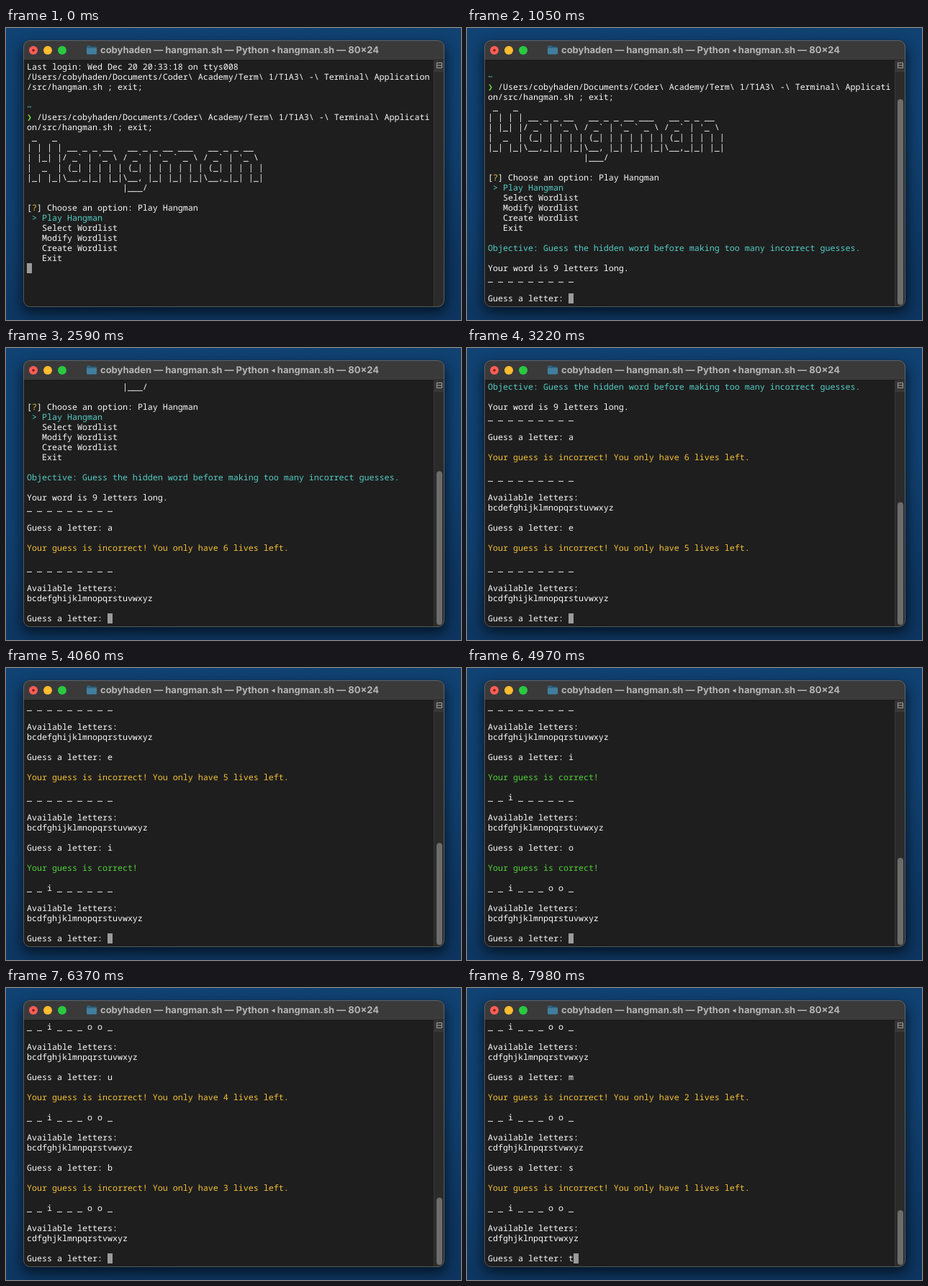
An HTML page that plays this animation: 632x406 px, repeating every 8 s.

```html
<!DOCTYPE html>
<html lang="en">
<head>
<meta charset="utf-8">
<title>Hangman in a terminal</title>
<style>
  html, body { margin: 0; width: 100%; height: 100%; overflow: hidden; background: #0d3660; }
  svg { display: block; width: 632px; height: 406px; }
  text { white-space: pre; text-rendering: geometricPrecision; }
  #screen text {
    font: 500 11.6667px "Noto Sans Mono", "DejaVu Sans Mono", monospace;
    font-variant-ligatures: none;
  }
  .title { font: 700 13px Inter, "Liberation Sans", sans-serif; fill: #b5b5b6; }
</style>
</head>
<body>
<svg viewBox="0 0 632 406" xmlns="http://www.w3.org/2000/svg">
  <defs>
    <linearGradient id="desk" x1="0" y1="0" x2="0.25" y2="1">
      <stop offset="0" stop-color="#104273"/>
      <stop offset="0.6" stop-color="#10406f"/>
      <stop offset="1" stop-color="#0d3560"/>
    </linearGradient>
    <filter id="blur" x="-10%" y="-10%" width="120%" height="125%">
      <feGaussianBlur stdDeviation="9"/>
    </filter>
    <clipPath id="frame"><rect x="24" y="17" width="585" height="371" rx="9"/></clipPath>
  </defs>

  <rect width="632" height="406" fill="url(#desk)"/>
  <rect x="22" y="24" width="589" height="372" rx="10" fill="#000" opacity=".6" filter="url(#blur)"/>

  <g clip-path="url(#frame)">
    <rect x="24" y="17" width="585" height="371" fill="#1e1e1e"/>
    <rect x="24" y="17" width="585" height="28" fill="#3a3a3b"/>
    <rect x="24" y="44.5" width="585" height="1" fill="#111"/>
    <rect x="594" y="45" width="15" height="343" fill="#2b2b2b"/>
    <rect x="594" y="45" width="1" height="343" fill="#383838"/>
    <rect x="594" y="45" width="15" height="15" fill="#353535"/>
    <rect x="594" y="59.5" width="15" height="1" fill="#444"/>
    <path d="M598.5 48.5h7v7h-7zM598.5 52h7" fill="none" stroke="#a0a0a0"/>
    <rect id="thumb" x="598" width="8" rx="4" fill="#6c6c6c"/>
  </g>
  <rect x="24.5" y="17.5" width="584" height="370" rx="9" fill="none" stroke="#777" stroke-opacity=".65"/>

  <circle cx="38" cy="31" r="6" fill="#fe5f57"/>
  <circle cx="38" cy="31" r="1.8" fill="#7d1712"/>
  <circle cx="58" cy="31" r="6" fill="#febc2e"/>
  <circle cx="78" cy="31" r="6" fill="#2ac840"/>

  <path d="M112 26q0-1.500 1.500-1.500h3.500l1.500 1.500h6q1.500 0 1.500 1.500v7.500q0 1.500-1.500 1.500h-11q-1.500 0-1.500-1.500z" fill="#2f6480"/>
  <path d="M112 28h14v7q0 1.500-1.500 1.500h-11q-1.500 0-1.500-1.500z" fill="#427f9d"/>

  <text class="title" x="131" y="35.300">cobyhaden — hangman.sh — Python</text>
  <path d="M368.500 31.500l5-2.700v5.400z" fill="#b5b5b6"/>
  <text class="title" x="518" y="35.300" text-anchor="end">hangman.sh — 80×24</text>

  <rect id="cursor" width="7" height="14" fill="#9b9b9b"/>
  <g id="screen"></g>
</svg>

<script>
const NS = "http://www.w3.org/2000/svg";
const LOOP = 8000, ROWS = 24, COLS = 80, CELL_W = 7, CELL_H = 14, LEFT = 29, TOP = 47;
const WHITE = "#fafafa", CYAN = "#55cdc6", GREEN = "#52d23a", YELLOW = "#f5c136", LIME = "#70dc3c";
const PROMPT = "Guess a letter: ";
const WORD = "??i???oo?";

const screen = document.getElementById("screen");
const cursor = document.getElementById("cursor");
const thumb = document.getElementById("thumb");

// Each line is a list of [column, text, colour] runs.
const lines = [];
const add = (text = "", color = WHITE, col = 0) => lines.push(text ? [[col, text, color]] : []);

const command = String.raw`/Users/cobyhaden/Documents/Coder\ Academy/Term\ 1/T1A3\ -\ Terminal\ Application/src/hangman.sh ; exit;`;

add("Last login: Wed Dec 20 20:33:18 on ttys008");
add(command.slice(0, COLS));
add(command.slice(COLS));
add();
add("~", CYAN);
lines.push([[0, "❯", LIME], [2, command.slice(0, COLS - 2), WHITE]]);
add(command.slice(COLS - 2));
[
  " _   _",
  "| | | | __ _ _ __   __ _ _ __ ___   __ _ _ __",
  "| |_| |/ _` | '_ \\ / _` | '_ ` _ \\ / _` | '_ \\",
  "|  _  | (_| | | | | (_| | | | | | | (_| | | | |",
  "|_| |_|\\__,_|_| |_|\\__, |_| |_| |_|\\__,_|_| |_|",
  "                   |___/"
].forEach(row => add(row));
add();
lines.push([[0, "[", WHITE], [1, "?", YELLOW], [2, "] Choose an option: Play Hangman", WHITE]]);
add("> Play Hangman", CYAN, 1);
["Select Wordlist", "Modify Wordlist", "Create Wordlist", "Exit"].forEach(s => add(s, WHITE, 3));

// States in time order: how many lines exist and where the cursor stands.
const states = [{ at: 0, total: lines.length + 1, col: 0, typed: "" }];
const mark = (at, typed = "") =>
  states.push({ at, total: lines.length, col: PROMPT.length + typed.length, typed });

const blanks = known => [...WORD].map(c => known.includes(c) ? c : "_").join(" ");

add();
add("Objective: Guess the hidden word before making too many incorrect guesses.", CYAN);
add();
add("Your word is 9 letters long.");
add(blanks(""));
add();
add(PROMPT);
mark(1050);

const guesses = [
  ["a", 2450, 2590], ["e", 2940, 3220], ["i", 3710, 4060], ["o", 4690, 4970],
  ["u", 5390, 5600], ["b", 6020, 6370], ["m", 6720, 7000], ["s", 7350, 7630]
];
let lives = 7, known = "", letters = "abcdefghijklmnopqrstuvwxyz";

for (const [letter, typedAt, shownAt] of guesses) {
  mark(typedAt, letter);
  lines[lines.length - 1] = [[0, PROMPT, WHITE], [PROMPT.length, letter, WHITE, typedAt]];
  letters = letters.replace(letter, "");
  add();
  if (WORD.includes(letter)) {
    known += letter;
    add("Your guess is correct!", GREEN);
  } else {
    add(`Your guess is incorrect! You only have ${--lives} lives left.`, YELLOW);
  }
  add();
  add(blanks(known));
  add();
  add("Available letters:");
  add(letters);
  add();
  add(PROMPT);
  mark(shownAt);
}
mark(7980, "t");
lines[lines.length - 1].push([PROMPT.length, "t", WHITE, 7980]);

function drawRun(row, [col, text, color]) {
  const el = document.createElementNS(NS, "text");
  el.setAttribute("x", LEFT + col * CELL_W);
  el.setAttribute("y", TOP + row * CELL_H + 11);
  el.setAttribute("fill", color);
  el.textContent = text;
  screen.appendChild(el);
}

function draw({ at, total, col }) {
  const first = Math.max(0, total - ROWS);
  screen.replaceChildren();
  lines.slice(first, total).forEach((runs, row) => {
    if (total < ROWS && row >= total - 1) return;
    runs.filter(run => (run[3] || 0) <= at).forEach(run => drawRun(row, run));
  });

  cursor.setAttribute("x", LEFT + col * CELL_W);
  cursor.setAttribute("y", TOP + (total - 1 - first) * CELL_H);

  const size = first ? ROWS / total * 324.8 - 2.7 : 0;
  thumb.setAttribute("y", 385 - size);
  thumb.setAttribute("height", size);
}

let shown = null;
function tick(now) {
  const t = now % LOOP;
  const state = states.findLast(s => s.at <= t) || states[0];
  if (state !== shown) draw(shown = state);
  requestAnimationFrame(tick);
}
tick(performance.now());
</script>
</body>
</html>
```
